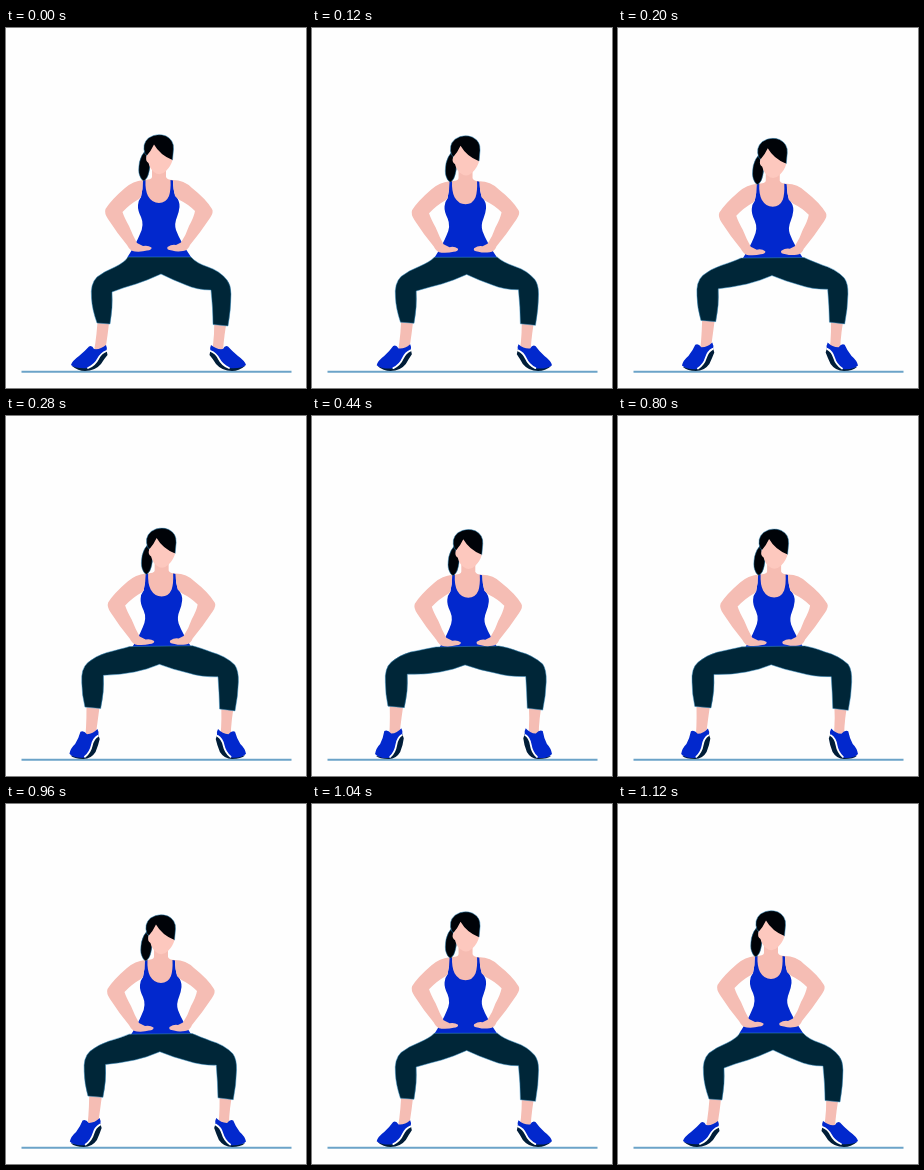
An HTML page for the animation above (1160 ms loop, 300x360 px).

```html
<!DOCTYPE html>
<html lang="en">
<head>
<meta charset="utf-8">
<title>Plie squat with heel raise</title>
<style>
html, body { margin: 0; width: 100%; height: 100%; overflow: hidden; background: #fefefe; }
svg { display: block; width: 100vw; height: 100vh; }
.skin { fill: #f5bdb4; }
.neck { fill: #f6bcb2; }
.face { fill: #fdc8be; }
.hair { fill: #000308; stroke: #2c86bb; stroke-width: .5; }
.blue { fill: #0228cd; }
.pants { fill: #002638; stroke: #3b91c4; stroke-width: .5; }
.white { fill: none; stroke: #fff; stroke-width: 1.8; stroke-linecap: round; }
.sole { fill: #001d38; }
</style>
</head>
<body>
<svg viewBox="0 0 300 360">
  <path d="M15.5 343.8H285.5" stroke="#6ba3c8" stroke-width="2.1"/>

  <!-- shins -->
  <path class="skin" d="M92 285L104 285Q102 307 99 323L88 323Q91 307 92 285Z"
    data-to="M77 282L92 282Q89 302 87 319L77 319Q78 302 77 282Z"/>
  <path class="skin" d="M208 286L222 286Q218 307 217 323L206 323Q209 307 208 286Z"
    data-to="M217 283L231 283Q227 303 227 319L217 319Q218 302 217 283Z"/>

  <g id="shoe">
    <path class="sole" d="M66 338Q72 343 79 343Q89 343 95 336Q98 331 101.5 327L100.5 322Q95 325 92 331Q88 337 82 339Z"
      data-to="M64 340Q67 343 77 343Q84 343 88 336Q91 328 91.5 322L90 318Q85 322 84 329Q82 336 78 341Z"/>
    <path class="blue" d="M65 337Q66 333 73 328Q79 323 83 318.5Q86 317 88 321Q94 322 100 317Q101.5 320 100.5 323Q95 325 92 331Q89 337 82 340Q70 341 65 337Z"
      data-to="M63 338Q64 332 68 328Q71 322 72 315Q75 313 79 317.5Q85 317 89 312Q91 315 90 319Q85 322 84 329Q83 336 78 342Q67 343 63 338Z"/>
    <path class="white" d="M100.5 323Q95 325 92 331Q89 337 82 340"
      data-to="M89.5 319Q85 322 84 329Q83 336 78 341"/>
  </g>
  <use id="otherShoe" href="#shoe"/>

  <g class="upper">
    <path class="neck" d="M146 141H160V149Q161 152 167 152L168 170L153 180L136 170L137 152Q146 152 146 149Z"/>
    <path class="blue" d="M136.5 152.5L139.500 152Q139 162 142 168Q146 175 153 175Q160 175 163 168Q165 162 164.500 152L167 152.500Q167 162 169.500 168Q174 173 173.500 179Q173 184 171 189Q168 196 170 202Q174 213 185 229V234H121.500V229Q130 216 134 206Q138.500 197 135 189Q131.500 182 132 177Q132 173 135 169Q137 161 136.500 152.500Z"/>
  </g>

  <path class="pants" d="M122 229L185 229Q190 235 202 239Q214 243 221 252Q225 257 225 266Q225 281 222 298L207 296.5Q207 281 205 262Q191 262 180 257Q167 252 155 246Q142 252 130 256Q119 259 106 264Q107 279 104 296L91 295Q86 281 85.5 270Q84 256 91 249Q99 243 109 239Q119 234 122 229Z"
    data-to="M124 231L187 230Q196 231 207 235.5Q221 239 231 248Q235 254 234.5 266Q234 280 231 294L215.5 292Q215 276 214 260.5Q197 261 183 257Q167 254 153 249Q141 254 128 256Q112 259 95 258Q96 275 92 291.5L75.5 290Q73 278 73 266Q72 252 79 246Q87 239 98 236Q113 233 124 231Z"/>

  <g class="upper">
    <path class="skin" d="M137 152Q127 153 119 160Q105 172 99.500 181Q98 185 102 191Q111 205 121 217Q124 223 129 223.500Q136 224 141 222.500Q146 222 145.500 219.500Q142 217 137 218L131 215Q127 208 123 198Q118 189 116.500 184Q124 176 133 171L135 169Q137 161 137 152Z"/>
    <path class="skin" d="M167 152Q178 152 186 160Q200 171 206 181Q208 184 204 190Q194 205 184 217Q182 222.500 177 223Q171 224 166 222.500Q160 222 161.500 219Q166 216 170 217L175 214.500Q180 207 183 198Q188 189 189 183Q182 176 173.500 172L169 168Q167 161 167 152Z"/>
    <path class="hair" d="M140 122Q135 127 133.500 134Q132 143 133.500 147Q135 152 138 153Q142 150 143 144Q145 137 142.500 132Q139 128 142 124Z"/>
    <path class="hair" d="M139 126Q135.500 116 142.500 110Q151 104.500 160 108Q168 112 167.500 121L166.500 132L150 134Z"/>
    <path class="face" d="M148 116.500Q154 127 166.500 132Q165 138 160 143Q154 149 148 144Q144 141 142.500 135Q139 133 140.500 128Q145 123 148 116.500Z"/>
  </g>
</svg>
<script>
const LOOP = 1160;
const shapes = [...document.querySelectorAll('[data-to]')].map(el => ({
  el,
  from: el.getAttribute('d'),
  to: el.dataset.to.match(/[\d.]+/g).map(Number)
}));
const uppers = document.querySelectorAll('.upper');
const otherShoe = document.getElementById('otherShoe');

const curve = (a, b, s) => 3 * (1 - s) ** 2 * s * a + 3 * (1 - s) * s * s * b + s ** 3;

// Cubic easing with flat ends; x1 and x2 set the handle lengths.
function ease(x, x1, x2) {
  x = Math.min(1, Math.max(0, x));
  let lo = 0, hi = 1;
  for (let i = 0; i < 24; i++) {
    const mid = (lo + hi) / 2;
    if (curve(x1, x2, mid) < x) lo = mid; else hi = mid;
  }
  return curve(0, 1, lo);
}

function lift(t) {
  return t < 600 ? ease(t / 560, .4, .2) : 1 - ease((t - 600) / 520, .9, .72);
}

function draw(now) {
  const p = lift(now % LOOP);
  for (const { el, from, to } of shapes) {
    let i = 0;
    el.setAttribute('d', from.replace(/[\d.]+/g, n => (+n + (to[i++] - n) * p).toFixed(2)));
  }
  for (const g of uppers) g.setAttribute('transform', `translate(${3.4 * p} ${7 * p})`);
  otherShoe.setAttribute('transform', `matrix(-1 0 0 1 ${305 - 2 * p} 0)`);
}

const start = performance.now();
function tick() {
  draw(performance.now() - start);
  requestAnimationFrame(tick);
}
tick();
</script>
</body>
</html>
```
